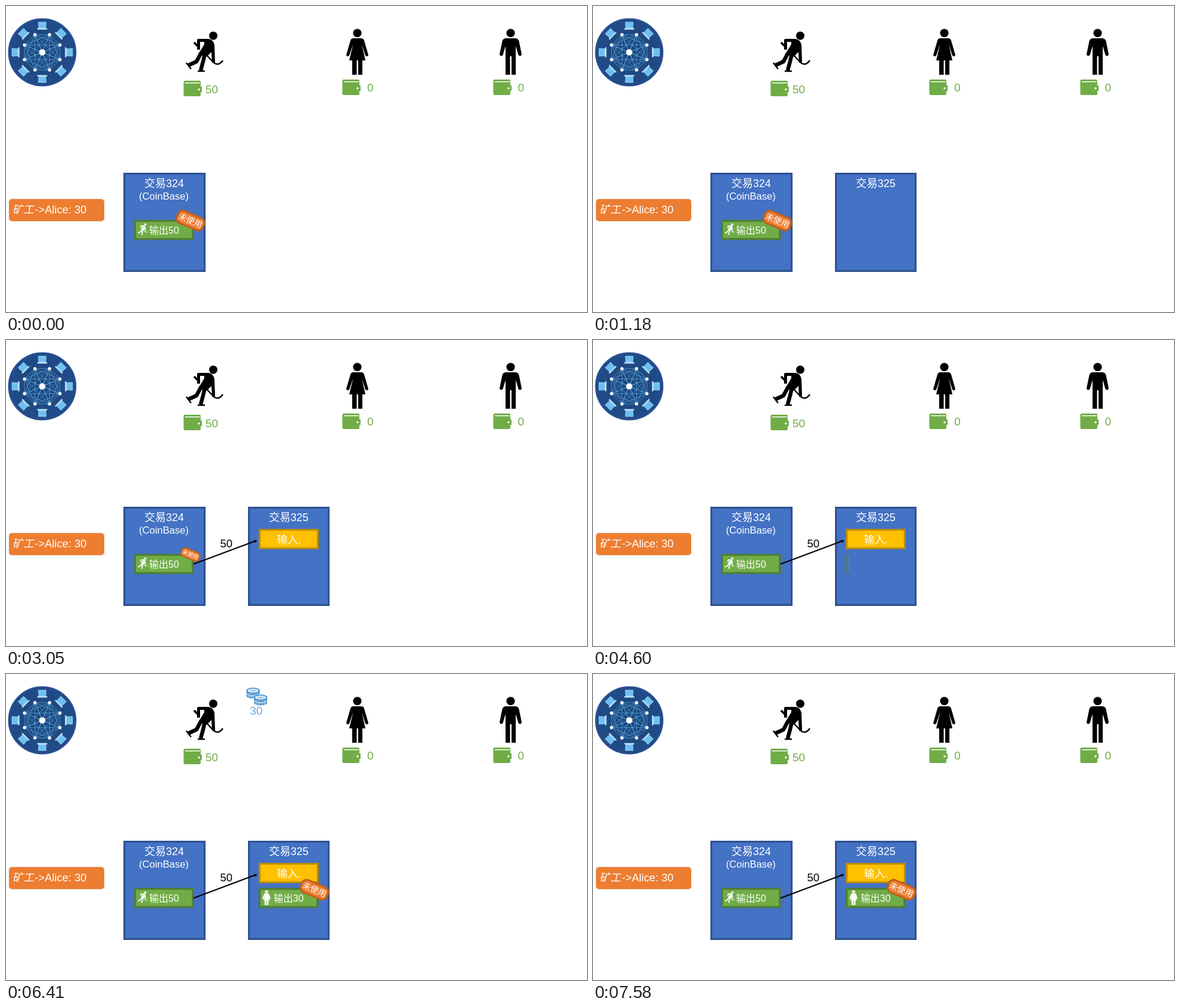
An HTML page for the animation above (8000 ms loop, 970 by 512 pixels).

```html
<!DOCTYPE html>
<html lang="zh">
<head>
<meta charset="utf-8">
<title>Transaction flow</title>
<style>
html, body { margin: 0; width: 100%; height: 100%; overflow: hidden; background: #fff; }
svg { display: block; width: 970px; height: 512px; }
text { font-family: "Liberation Sans", "Noto Sans CJK SC", "Noto Sans CJK", sans-serif; font-size: 18px; }
.mid { text-anchor: middle; }
.white { fill: #fff; }
.green { fill: #70ad47; font-size: 19px; }
.box { fill: #4472c4; stroke: #2f528f; stroke-width: 3.2; }
.out { fill: #70ad47; stroke: #507e32; stroke-width: 3.2; }
.line { fill: none; stroke: currentColor; stroke-linejoin: round; }
</style>
</head>
<body>
<svg id="stage" viewBox="0 0 970 512">
<defs id="defs">
  <radialGradient id="disc"><stop offset=".5" stop-color="#1e4880"/><stop offset="1" stop-color="#214c8a"/></radialGradient>
  <g id="miner" fill="currentColor">
    <circle cx="346" cy="49.7" r="7"/>
    <path d="M320 55H338Q346 56 348 65L349 94 344 95 343 77 335 85 321 81 331 64V60H320Z"/>
    <path class="line" stroke-width="5" d="M330 57.5H321.5V73"/>
    <path class="line" stroke-width="3.5" d="M314 61L323 70"/>
    <path class="line" stroke-width="6.5" d="M326 78L318 93 304 99.500M332 80L329 93 325 108"/>
    <path class="line" stroke-width="2.4" d="M332 79L347 95Q355 101 362 91M301 95L309 105.500M320 109H332"/>
  </g>
  <g id="woman" fill="currentColor">
    <circle cx="586.500" cy="45.200" r="7"/>
    <path d="M580 54H593Q597 54 598 58L605 82Q603 86 600 83L594 64 600 91H595V115H588V91H585.500V115H578V91H573L579.500 64 573 83Q570 86 568 82L575 58Q576 54 580 54Z"/>
  </g>
  <g id="man" fill="currentColor">
    <circle cx="842.500" cy="45.200" r="7"/>
    <path d="M835 54H850Q855 54 856.500 59L861 81Q859 86 855.500 82L851 67V115H844V84H841.500V115H834V67L829.500 82Q826 86 824 81L828.500 59Q830 54 835 54Z"/>
  </g>
  <g id="wallet">
    <path fill="#70ad47" d="M299 125H323Q325 125 325 127V135H327V144H325V149Q325 151 323 151H299Q296.500 151 296.500 148V128Q296.500 125 299 125Z"/>
    <path stroke="#fff" stroke-width="1.500" d="M299 128.700H324"/>
    <circle cx="322" cy="139.700" r="1.800" fill="#fff"/>
  </g>
  <g id="badge">
    <g transform="rotate(23)">
      <rect x="-23.500" y="-11" width="47" height="22" rx="8.500" fill="#ed7d31" stroke="#bd601d" stroke-width="3"/>
      <text class="mid white" y="5" style="font-size:14px">未使用</text>
    </g>
  </g>
  <g id="laptop">
    <path d="M-6.500 -50.500H6.500L6 -41H-6Z" fill="#6cc0f3" stroke="#a9dcf8" stroke-width=".8"/>
    <path d="M-8 -40.500H8L8.500 -38H-8.500Z" fill="#b9e2f8"/>
  </g>
  <g id="stack">
    <path d="M-11.500 0V9A11.500 5 0 0 0 11.500 9V0Z" fill="#5b9bd5" stroke="#fff"/>
    <path d="M-11 5.500A11.500 5 0 0 0 11 5.500" fill="none" stroke="#fff"/>
    <path d="M-7 5V7.500M-2.500 6V9M2.500 6V9M7 5V7.500M-7 10V12.500M-2.500 11V13.500M2.500 11V13.500M7 10V12.500" stroke="#fff" stroke-width=".8"/>
    <ellipse rx="11.500" ry="5" fill="#5b9bd5"/>
    <ellipse rx="8.800" ry="3" fill="#fff"/>
    <ellipse rx="6.500" ry="1.800" fill="#a9cbea"/>
  </g>
</defs>

<g id="net" transform="translate(60.5 77.5)">
  <circle r="56.300" fill="url(#disc)" stroke="#2f5597" stroke-width="1.500"/>
</g>

<use href="#miner"/><use href="#woman"/><use href="#man"/>
<use href="#wallet"/><use href="#wallet" x="265" y="-2"/><use href="#wallet" x="517" y="-2"/>
<text class="green" x="333" y="146">50</text>
<text class="green" x="603" y="142.500">0</text>
<text class="green" x="854.500" y="142.500">0</text>

<rect x="3.800" y="321.800" width="161.400" height="39.400" rx="6" fill="none" stroke="#ddd" stroke-width=".6"/>
<rect x="5" y="323" width="159" height="37" rx="5" fill="#ed7d31"/>
<text class="white" transform="translate(11 347) skewX(-10)" font-weight="300">矿工</text>
<text class="white" x="48" y="347" style="font-size:18.2px">-&gt;Alice: 30</text>

<rect class="box" x="197.600" y="280.600" width="134" height="162.800"/>
<text class="mid white" x="264" y="303">交易324</text>
<text class="mid white" x="263.500" y="324" style="font-size:16.6px">(CoinBase)</text>
<rect class="out" x="215.500" y="359.500" width="96.500" height="30.400"/>
<use href="#miner" transform="translate(135.7 351.7) scale(.28)" color="#fff"/>
<text class="white" x="239" y="380.500" style="font-size:16px">输出50</text>
<g id="spent"><use href="#badge"/></g>

<g id="block">
  <rect class="box" x="405.600" y="280.600" width="133" height="162.800"/>
  <text class="mid white" x="472" y="303">交易325</text>
</g>
<g id="input">
  <rect x="423.500" y="317.500" width="97" height="31" fill="#ffc000" stroke="#bc8c00" stroke-width="3"/>
  <text class="mid white" x="472.500" y="340" style="font-size:17.5px">输入.</text>
</g>
<g id="arrow">
  <path d="M313 375L417 336" stroke="#000" stroke-width="2.200"/>
  <path d="M419.500 335.500L414 334.300 416 339.500Z"/>
  <text x="357.500" y="346.500" style="font-size:18.5px">50</text>
</g>
<g id="output">
  <rect class="out" x="423.500" y="359.500" width="96.500" height="30.400"/>
  <use href="#woman" transform="translate(212.1 349.7) scale(.38 .32)" color="#fff"/>
  <text class="white" x="447" y="380.500" style="font-size:16px">输出30</text>
</g>
<g id="unspent"><use href="#badge" x="515" y="361"/></g>
<g id="coins"><g id="money">
  <use href="#stack" x="12" y="6"/>
  <use href="#stack" x="24.500" y="17.500"/>
  <text x="6.800" y="46.500" style="font-size:19px" fill="#6ea6da">30</text>
</g></g>
</svg>
<script>
const $ = id => document.getElementById(id);
const clamp = v => Math.min(1, Math.max(0, v));
const LOOP = 8000;

// Network: every node joined to every other, laptops around the rim
const polar = (i, r) => {
  const a = (i + .5) * Math.PI / 4;
  return [r * Math.cos(a), r * Math.sin(a)];
};
let lines = "", dots = "", laptops = "";
for (let i = 0; i < 8; i++) {
  const [x, y] = polar(i, 32);
  lines += `M0 0L${x} ${y}`;
  for (let j = 0; j < i; j++) lines += `M${x} ${y}L${polar(j, 32)}`;
  dots += `<circle cx="${x}" cy="${y}" r="2.700" fill="#fff"/>`;
  laptops += `<use href="#laptop" transform="rotate(${i * 45})"/>`;
}
$("net").innerHTML += `<path d="${lines}" stroke="#5fb4e0" stroke-width=".7"/>${dots}${laptops}<circle r="5.300" fill="#fff"/>`;

// Soft-edged wipes: id, axis, start, duration, from, to
const wipes = [
  ["block", "y", 664, 500, 279, 445],
  ["input", "x", 1230, 500, 422, 522],
  ["arrow", "x", 2390, 500, 312, 421],
  ["output", "x", 4565, 500, 422, 522],
  ["unspent", "x", 5065, 500, 490, 540],
  ["money", "x", 5565, 365, 0, 37]
];
for (const [id] of wipes) {
  $("defs").insertAdjacentHTML("beforeend",
    `<linearGradient id="${id}Edge" gradientUnits="userSpaceOnUse" x1="0" y1="0" x2="0" y2="0">
      <stop stop-color="#fff"/><stop offset="1" stop-color="#000"/></linearGradient>
    <mask id="${id}Mask" maskUnits="userSpaceOnUse" x="0" y="0" width="970" height="512">
      <rect width="970" height="512" fill="url(#${id}Edge)"/></mask>`);
  $(id).setAttribute("mask", `url(#${id}Mask)`);
}

function wipe([id, axis, start, span, from, to], t) {
  const p = clamp((t - start) / span), soft = (to - from) * .14;
  const edge = from + p * (to - from + soft);
  $(id + "Edge").setAttribute(axis + "1", edge - soft);
  $(id + "Edge").setAttribute(axis + "2", edge);
  $(id).style.display = p ? "" : "none";
}

// Place a group at x, y, scaled by s about its local centre cx, cy
function zoom(id, x, y, s, cx = 0, cy = 0) {
  $(id).setAttribute("transform", `translate(${x + cx} ${y + cy}) scale(${s}) translate(${-cx} ${-cy})`);
  $(id).style.display = s ? "" : "none";
}

function draw(t) {
  for (const w of wipes) wipe(w, t);
  zoom("spent", 308, 359, 1 - clamp((t - 2890) / 500));
  const p = clamp((t - 5929) / 1300);
  const x = 325 + 244 * p * p * (3 - 2 * p);
  const y = 19 + .0014 * (x - 445) ** 2;
  zoom("coins", x, y, 1 - clamp((t - 7230) / 350), 18, 24);
}

let begin;
function tick(now) {
  begin ??= now;
  draw((now - begin) % LOOP);
  requestAnimationFrame(tick);
}
draw(0);
requestAnimationFrame(tick);
</script>
</body>
</html>
```
